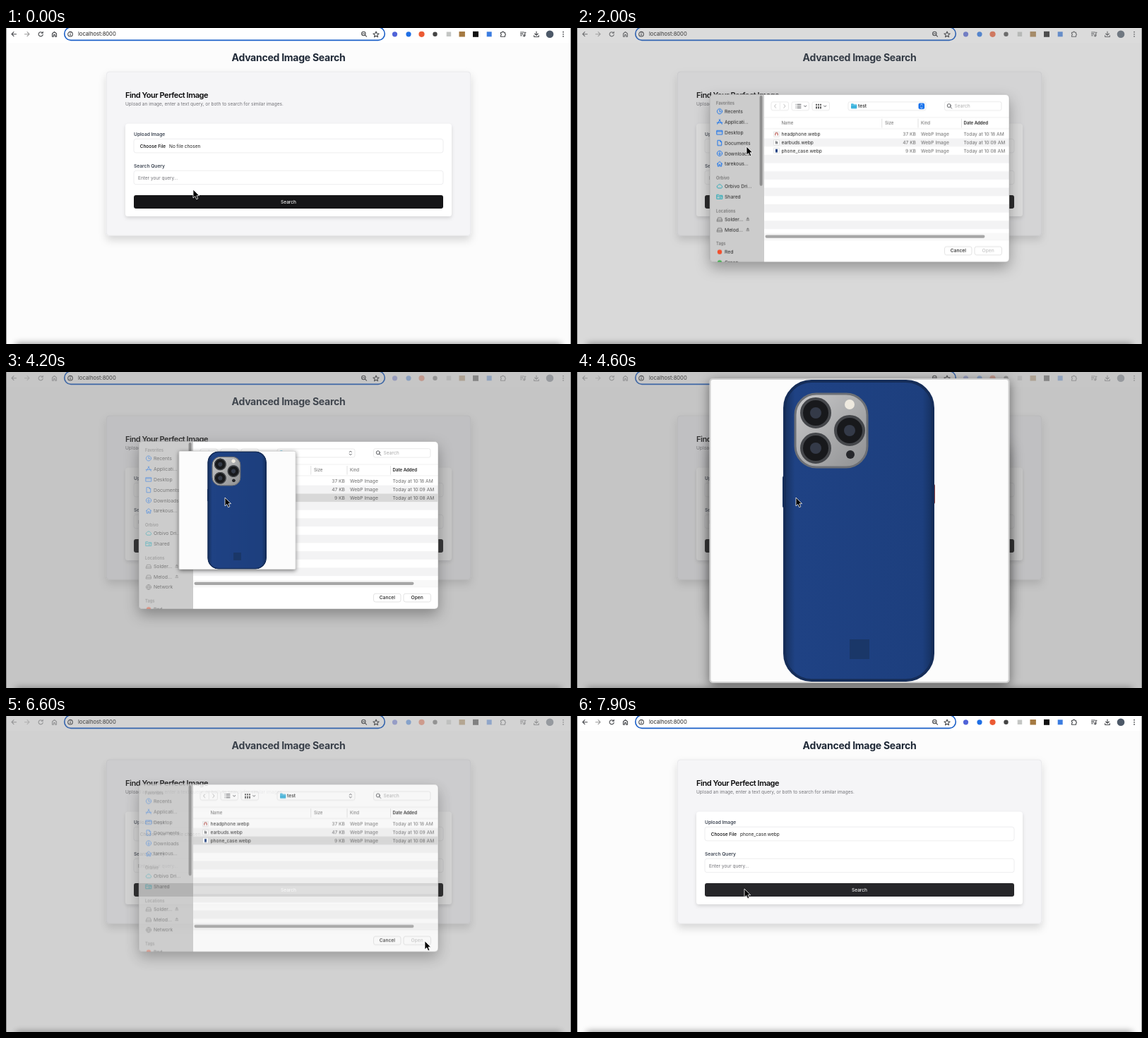
Recreate the animation shown at these times as an HTML page. Size 800 by 448 pixels, loop 8 s.

```html
<!DOCTYPE html>
<html lang="en">
<head>
<meta charset="utf-8">
<title>Advanced Image Search</title>
<style>
html, body { margin: 0; width: 100%; height: 100%; overflow: hidden; background: #fcfcfc; }
svg { display: block; }
text { font: 400 6.5px Inter, "Noto Sans", sans-serif; white-space: pre; }
.medium { font-weight: 500; }
.semi { font-weight: 600; }
.line { fill: none; stroke: #45474b; stroke-width: 1.1; stroke-linecap: round; stroke-linejoin: round; }
.dlg text { font-size: 6.7px; }
.dlg .head { font-size: 6.1px; }
.side text { font-size: 6.8px; fill: #262626; }
.side .group { font-size: 5.8px; font-weight: 600; fill: #777; }
.icon { fill: none; stroke: #1672ee; stroke-width: .95; stroke-linejoin: round; stroke-linecap: round; }
.teal { stroke: #1fa9b8; }
.gray { stroke: #777; }
.sub { fill-opacity: .66; }

/* Every move advances ten times a second */
.cursor, .dim, .tools, .dlg, .preview, .late, .net, .active, .side, .pick, .chosen, .ready, .row2, .before, .after, .hover {
  animation: 8s step-end infinite;
}
.cursor { animation-name: cursor; }
.dim { animation-name: dim; }
.tools { animation-name: tools; }
.dlg { animation-name: dialog; }
.preview { animation-name: preview; }
.late { animation-name: late; }
.net { animation-name: net; }
.active { animation-name: active; }
.side { animation-name: side; }
.pick { animation-name: pick; }
.chosen { animation-name: chosen; }
.ready { animation-name: ready; }
.row2 { animation-name: row; }
.before { animation-name: before; }
.after { animation-name: after; }
.hover { animation-name: hover; }

@keyframes cursor {
  0% { transform: translate(265px, 229px); animation-timing-function: steps(2); }
  2.5% { transform: translate(261px, 220px); animation-timing-function: steps(3); }
  6.25% { transform: translate(247px, 185px); animation-timing-function: steps(4); }
  11.25% { transform: translate(240px, 168px); }
  32.5% { transform: translate(240px, 168px); animation-timing-function: steps(3); }
  36.25% { transform: translate(285px, 166px); animation-timing-function: steps(2); }
  38.75% { transform: translate(305px, 168px); animation-timing-function: steps(3); }
  42.5% { transform: translate(310px, 178px); }
  68.75% { transform: translate(310px, 178px); animation-timing-function: steps(2); }
  71.25% { transform: translate(420px, 245px); animation-timing-function: steps(3); }
  75% { transform: translate(593px, 319px); }
  83.75% { transform: translate(593px, 319px); animation-timing-function: steps(2); }
  86.25% { transform: translate(585px, 310px); animation-timing-function: steps(3); }
  90% { transform: translate(480px, 288px); animation-timing-function: steps(3); }
  93.75% { transform: translate(310px, 258px); animation-timing-function: steps(2); }
  96.25% { transform: translate(250px, 247px); animation-timing-function: steps(2); }
  98.75%, 100% { transform: translate(237px, 245px); }
}
@keyframes dim {
  0% { opacity: 0; }
  25% { opacity: .25; animation-timing-function: steps(4); }
  30% { opacity: .4; }
  80% { opacity: .4; animation-timing-function: steps(2); }
  82.5% { opacity: .31; animation-timing-function: steps(3); }
  86.25%, 100% { opacity: 0; }
}
@keyframes tools {
  0% { opacity: 1; }
  25% { opacity: .8; animation-timing-function: steps(4); }
  30% { opacity: .45; }
  82.5% { opacity: .5; animation-timing-function: steps(3); }
  86.25%, 100% { opacity: 1; }
}
@keyframes dialog {
  0% { opacity: 0; }
  25% { opacity: 1; transform: translateY(-4.3px); animation-timing-function: steps(4); }
  30% { opacity: 1; transform: none; }
  80% { opacity: 1; transform: none; animation-timing-function: steps(2); }
  82.5% { opacity: .84; transform: translateY(-1.7px); animation-timing-function: steps(2); }
  85%, 100% { opacity: 0; transform: translateY(-4px); }
}
@keyframes preview {
  0% { opacity: 0; }
  52.5% { opacity: 1; transform: translate(327.5px, 196px) scale(.39); animation-timing-function: steps(2); }
  55% { opacity: 1; transform: translate(390px, 221px) scale(.916); animation-timing-function: steps(2); }
  57.5% { opacity: 1; transform: translate(400px, 225px) scale(1); }
  65% { opacity: 1; transform: translate(375px, 215px) scale(.79); }
  66.25% { opacity: 1; transform: translate(314.5px, 191px) scale(.286); }
  67.5% { opacity: .6; transform: translate(288px, 180px) scale(.06); }
  68.75%, 100% { opacity: 0; }
}
@keyframes late { 0% { transform: translateY(-14.7px); } 27.5%, 100% { transform: none; } }
@keyframes net { 0% { opacity: 0; } 27.5%, 100% { opacity: 1; } }
@keyframes active { 0%, 68.75% { opacity: 1; } 52.5%, 77.5%, 100% { opacity: 0; } }
@keyframes side { 0%, 68.75% { opacity: 1; } 52.5%, 77.5%, 100% { opacity: .5; } }
@keyframes pick { 0%, 52.5%, 77.5%, 100% { opacity: 0; } 43.75%, 68.75% { opacity: 1; } }
@keyframes chosen { 0% { opacity: 0; } 43.75%, 100% { opacity: 1; } }
@keyframes ready { 0%, 77.5%, 100% { fill: #c4c4c4; } 43.75%, 52.5% { fill: #222; } }
@keyframes row { 0%, 52.5%, 77.5%, 100% { fill: #222; } 43.75%, 68.75% { fill: #fff; } }
@keyframes before { 0% { opacity: 1; } 83.75%, 100% { opacity: 0; } }
@keyframes after { 0% { opacity: 0; } 83.75%, 100% { opacity: 1; } }
@keyframes hover { 0% { fill: #151517; } 95%, 100% { fill: #27272a; } }
</style>
</head>
<body>
<svg width="800" height="448" viewBox="0 0 800 448">
<defs>
  <filter id="soft" x="-10%" y="-200%" width="120%" height="500%"><feGaussianBlur stdDeviation="5"/></filter>
  <filter id="cardShade" x="-10%" y="-10%" width="120%" height="130%"><feDropShadow dx="0" dy="6" stdDeviation="6" flood-opacity=".15"/></filter>
  <filter id="formShade" x="-10%" y="-10%" width="120%" height="130%"><feDropShadow dx="0" dy="2.5" stdDeviation="2.5" flood-opacity=".13"/></filter>
  <filter id="dlgShade" x="-15%" y="-15%" width="130%" height="140%"><feDropShadow dx="0" dy="8" stdDeviation="10" flood-opacity=".32"/></filter>
  <filter id="viewShade" x="-15%" y="-15%" width="130%" height="130%"><feDropShadow dx="0" dy="4" stdDeviation="8" flood-opacity=".5"/></filter>
  <linearGradient id="steel" x2="1" y2="1"><stop stop-color="#c9c9ca"/><stop offset="1" stop-color="#8f9092"/></linearGradient>
  <linearGradient id="case"><stop stop-color="#17315f"/><stop offset=".07" stop-color="#1f4284"/><stop offset=".93" stop-color="#1d3f7e"/><stop offset="1" stop-color="#15305f"/></linearGradient>
  <clipPath id="dlgClip"><rect x="188" y="98.5" width="424" height="237.5" rx="5"/></clipPath>
  <g id="eject"><path d="M239.5 0 241.8-2.7 244.1 0ZM239.5 1h4.6v1h-4.6Z" fill="#777"/></g>
</defs>

<rect width="800" height="448" fill="#fcfcfc"/>
<rect width="800" height="21.5" fill="#fff"/>
<rect x="14" y="447" width="772" height="20" fill="#000" opacity=".42" filter="url(#soft)"/>

<!-- Browser bar -->
<rect x="82.7" y="-1" width="453.6" height="18.4" rx="9.2" fill="#fff" stroke="#1a5fc8" stroke-width="1.6"/>
<text x="102" y="11.3" style="font-size:7.6px" fill="#222">localhost:8000</text>
<g class="line" stroke-width=".9">
  <circle cx="91" cy="8.7" r="3.3"/><path d="M91 8.4v2M91 6.8v.1"/>
  <circle cx="506.3" cy="8" r="2.7"/><path d="M508.4 10.1 510.5 12.2M505 8h2.6"/>
  <path d="M524 5 525.2 7.7 528.1 8 525.9 9.9 526.5 12.8 524 11.3 521.5 12.8 522.1 9.9 519.9 8 522.8 7.7Z"/>
</g>
<g class="tools">
  <g class="line">
    <path d="M14.5 8.7H8M11 5.7 8 8.7 11 11.7"/>
    <path d="M26.5 8.7H33M30 5.7 33 8.7 30 11.7" stroke="#999"/>
    <path d="M51.7 7A3.1 3.1 0 1 0 52.2 9.4M52.2 5.4V7.3H50.2"/>
    <path d="M65.5 8 68.5 5.5 71.5 8V12.2H69.6V9.6H67.4V12.2H65.5Z"/>
    <path d="M700.5 6.3H702.4A1.2 1.2 0 0 1 704.8 6.3H706.5V8.2A1.2 1.2 0 0 1 706.5 10.5V12.3H700.5V10.5A1.2 1.2 0 0 0 700.5 8.2Z"/>
    <path d="M728.5 6H733.5M728.5 8.4H732M728.5 10.8H730.5M734.8 10.8V6.2H736"/><circle cx="733.7" cy="10.8" r="1.1"/>
    <path d="M751 5V10M748.7 8 751 10.3 753.3 8M747.7 10.5V12.5H754.3V10.5"/>
  </g>
  <circle cx="550.5" cy="8.8" r="3.6" fill="#4f63d8"/>
  <circle cx="570" cy="8.8" r="3.6" fill="#1f6fe5"/>
  <circle cx="588.5" cy="8.8" r="4.1" fill="#ec5a33"/>
  <circle cx="607.5" cy="8.8" r="3.2" fill="#444"/>
  <rect x="623.7" y="5.5" width="6.5" height="6.5" fill="#c4c6c4"/>
  <rect x="641.5" y="5" width="8.4" height="7.5" fill="#a57a42"/>
  <rect x="661" y="4.8" width="8" height="8" fill="#111"/>
  <rect x="680.7" y="5.3" width="7" height="7" fill="#3b7ce0"/>
  <circle cx="770" cy="8.8" r="5.3" fill="#4d5968"/>
  <g fill="#45474b"><circle cx="789" cy="5.7" r=".9"/><circle cx="789" cy="8.8" r=".9"/><circle cx="789" cy="11.9" r=".9"/></g>
</g>

<!-- Page -->
<text x="400" y="46.8" text-anchor="middle" style="font-size:14px;font-weight:700;letter-spacing:-.26px" fill="#1f2937">Advanced Image Search</text>
<rect x="142.3" y="62" width="515.4" height="232.3" rx="4" fill="#f5f5f7" stroke="#e3e3e6" stroke-width=".7" filter="url(#cardShade)"/>
<text x="169" y="98.8" class="semi" style="font-size:11px;letter-spacing:-.45px" fill="#0a0a0b">Find Your Perfect Image</text>
<text x="169" y="110.2" fill="#737378">Upload an image, enter a text query, or both to search for similar images.</text>
<rect x="169" y="135.7" width="462" height="131.3" rx="4" fill="#fff" filter="url(#formShade)"/>
<text x="181" y="153" class="semi" style="font-size:6.65px" fill="#3f4754">Upload Image</text>
<text x="181" y="197.8" class="semi" style="font-size:6.65px" fill="#3f4754">Search Query</text>
<g fill="#fff" stroke="#e6e6e9" stroke-width=".7">
  <rect x="181" y="157.3" width="438" height="19.6" rx="3"/>
  <rect x="181" y="202.3" width="438" height="19.4" rx="3"/>
</g>
<text x="189.7" y="169.5" class="medium" fill="#0a0a0b">Choose File</text>
<text x="231" y="169.5" class="before" fill="#222">No file chosen</text>
<text x="231" y="169.5" class="after" fill="#222">phone_case.webp</text>
<text x="187" y="214.5" fill="#737378">Enter your query...</text>
<rect class="hover" x="181" y="237" width="438" height="19" rx="3" fill="#151517"/>
<text x="400" y="248.7" text-anchor="middle" class="medium" fill="#f5f5f5">Search</text>

<rect class="dim" width="800" height="448" fill="#707070"/>
<path d="M.4 0V448M799.6 0V448" stroke="#777" stroke-width=".8"/>

<!-- File dialog -->
<g class="dlg">
  <rect x="188" y="98.5" width="424" height="237.5" rx="5" fill="#fff" filter="url(#dlgShade)"/>
  <g clip-path="url(#dlgClip)">
    <rect x="188" y="98.5" width="76.5" height="238" fill="#ccc"/>
    <path d="M264.5 98V337" stroke="#b9b9b9" stroke-width=".6"/>
    <g class="side" id="side"></g>
    <rect x="258.6" y="100" width="4" height="128" rx="2" fill="#8e8e8e"/>
    <g id="stripes" fill="#f3f3f4"></g>
    <path d="M265 131H612M265 147H612M265 304.7H612" stroke="#e6e6e6" stroke-width=".6"/>
    <path d="M431.7 133V145.5M483 133V145.5M544.5 133V145.5" stroke="#d4d4d4" stroke-width=".7"/>
    <rect x="265" y="295" width="347" height="9.5" fill="#f8f8f8"/>
    <rect x="266.5" y="297.7" width="311" height="4.2" rx="2.1" fill="#a6a6a6"/>
  </g>
  <rect x="188" y="98.5" width="424" height="237.5" rx="5" fill="none" stroke="#999" stroke-width=".5"/>

  <g fill="#fff" stroke="#dcdcdc" stroke-width=".6">
    <rect x="275" y="109" width="24.5" height="12" rx="2.5"/>
    <rect x="304" y="109" width="24.5" height="12" rx="2.5"/>
    <rect x="333" y="109" width="24.5" height="12" rx="2.5"/>
    <rect x="384" y="109" width="110" height="12" rx="2.5"/>
    <rect x="520.5" y="108.7" width="80.5" height="12.4" rx="2.5"/>
    <path d="M287.3 110V120"/>
  </g>
  <g class="line" style="stroke-width:.9">
    <path d="M281.7 112.5 279.5 115 281.7 117.5M292.8 112.5 295 115 292.8 117.5" stroke="#bbb" style="stroke:#b5b5b5"/>
    <path d="M310 112.5h.1M310 115h.1M310 117.5h.1M312 112.5H317M312 115H317M312 117.5H317"/>
    <path d="M321.6 114.3 323.2 115.9 324.8 114.3M349.6 114.3 351.2 115.9 352.8 114.3"/>
    <circle cx="526.8" cy="114.3" r="2.5"/><path d="M528.7 116.2 530.6 118.2"/>
    <path d="M486.2 113.7 487.8 112.1 489.4 113.7M486.2 116.1 487.8 117.7 489.4 116.1"/>
  </g>
  <path d="M338 112h2v2h-2zM341 112h2v2h-2zM344 112h2v2h-2zM338 115.5h2v3h-2zM341 115.5h2v3h-2zM344 115.5h2v3h-2z" fill="#555"/>
  <path d="M388 112.2q0-.8.8-.8h2.3l1 1h3.4q.8 0 .8.8v4.6q0 .8-.8.8h-6.7q-.8 0-.8-.8z" fill="#36b1dc"/>
  <path d="M388 113.8h8.3" stroke="#8fd7ef" stroke-width=".7"/>
  <text x="398" y="117.3" class="medium" fill="#222">test</text>
  <g class="active">
    <rect x="483.5" y="110.7" width="8.6" height="8.6" rx="2" fill="#1470ec"/>
    <path d="M486.2 113.8 487.8 112.2 489.4 113.8M486.2 116.2 487.8 117.8 489.4 116.2" fill="none" stroke="#fff" stroke-width=".9"/>
  </g>
  <text x="534.5" y="117.3" fill="#aaa">Search</text>

  <g fill="#666">
    <text class="head" x="289.5" y="141.2">Name</text>
    <text class="head" x="436" y="141.2">Size</text>
    <text class="head" x="487" y="141.2">Kind</text>
  </g>
  <text class="head semi" x="547.5" y="141.2" fill="#222">Date Added</text>

  <rect class="chosen" x="265" y="172.4" width="347" height="11.7" fill="#d8d8d8"/>
  <rect class="pick" x="265" y="172.4" width="347" height="11.7" fill="#1261d6"/>
  <g id="rows"></g>

  <g fill="#fff" stroke="#d2d2d2" stroke-width=".6">
    <rect x="520.5" y="314.2" width="38.5" height="11.8" rx="2.8"/>
    <rect x="563" y="314.2" width="38.5" height="11.8" rx="2.8"/>
  </g>
  <text x="539.8" y="322.4" text-anchor="middle" class="medium" fill="#222">Cancel</text>
  <text x="582.2" y="322.4" text-anchor="middle" class="ready medium">Open</text>
  <g class="pick">
    <rect x="563" y="314.2" width="38.5" height="11.8" rx="2.8" fill="#1672ee"/>
    <text x="582.2" y="322.4" text-anchor="middle" class="medium" fill="#fff">Open</text>
  </g>
</g>

<!-- Enlarged picture, drawn around its centre -->
<g class="preview">
  <rect x="-211.5" y="-215" width="423" height="430" rx="4" fill="#fcfcfc" stroke="#cfcfcf" stroke-width="2" filter="url(#viewShade)"/>
  <rect x="-109" y="-78" width="6" height="46" rx="3" fill="#17305c"/>
  <rect x="102" y="-66" width="5" height="28" rx="2" fill="#8b4143"/>
  <rect x="-106" y="-212" width="210" height="424" rx="38" fill="url(#case)" stroke="#152d59" stroke-width="4"/>
  <rect x="-91" y="-194" width="102" height="104" rx="30" fill="url(#steel)" stroke="#6d7076" stroke-width="3"/>
  <g fill="#18191c" stroke="#45474b" stroke-width="4">
    <circle cx="-62" cy="-167" r="20"/><circle cx="-62" cy="-117" r="20"/><circle cx="-14" cy="-142" r="20"/>
  </g>
  <g fill="#343a48"><circle cx="-62" cy="-167" r="8"/><circle cx="-62" cy="-117" r="8"/><circle cx="-14" cy="-142" r="8"/></g>
  <circle cx="-14" cy="-179" r="7" fill="#eee9df"/><circle cx="-13" cy="-108" r="6" fill="#26272b"/>
  <rect x="-14" y="154" width="28" height="28" fill="#1a3768"/>
</g>

<path class="cursor" d="M0 0V12L2.8 9.5 4.7 13.8 6.8 12.9 5 8.7H8.6Z" fill="#000" stroke="#fff" stroke-width=".8" stroke-linejoin="round"/>
</svg>
<script>
const byId = id => document.getElementById(id);

// Icon outlines, centred on 0,0
const disk = 'M-3.5 1 -2.3-2H2.3L3.5 1V3H-3.5ZM-3.5 1H3.5';
const icons = {
  clock: 'M3.6 0A3.6 3.6 0 1 1 3.6-.1M0-2V.3H1.8',
  apps: 'M-3.3 3 .6-3.4M3.3 3-.6-3.4M-3.8 1H3.8',
  desk: 'M-3.8-2.6H3.8V2.8H-3.8ZM-3.8-1.2H3.8',
  doc: 'M-2.6-3.6H.8L2.7-1.7V3.6H-2.6ZM.8-3.6V-1.7H2.7',
  down: 'M3.6 0A3.6 3.6 0 1 1 3.6-.1M0-1.9V1.7M-1.4.4 0 1.8 1.4.4',
  home: 'M-3.8 0 0-3.4 3.8 0M-2.7-.7V3.2H-.8V.8H.8V3.2H2.7V-.7',
  cloud: 'M-2.3 2.4A1.9 1.9 0 0 1-2.4-1.3 2.7 2.7 0 0 1 2.5-1 1.8 1.8 0 0 1 2.4 2.4Z',
  folder: 'M-3.8-2.8H-1L0-1.8H3.8V3H-3.8ZM-3.8-.5H3.8M0 1.4H1.8',
  disk,
  globe: 'M3.6 0A3.6 3.6 0 1 1 3.6-.1M-3.6 0H3.6M0-3.6C-2-1.5-2 1.5 0 3.6 2 1.5 2-1.5 0-3.6'
};
const group = (y, name) => `<text class="group" x="197" y="${y + 2}">${name}</text>`;
const item = (y, name, icon, tone = '') =>
  `<path class="icon ${tone}" transform="translate(202 ${y})" d="${icons[icon]}"/>` +
  `<text x="209" y="${y + 2.4}">${name}</text>`;
const tag = (y, name, color) =>
  `<circle cx="202" cy="${y}" r="3.2" fill="${color}"/><text x="209" y="${y + 2.4}">${name}</text>`;
const eject = y => `<use href="#eject" y="${y}"/>`;

byId('side').innerHTML =
  group(111, 'Favorites') +
  item(122.5, 'Recents', 'clock') +
  item(137.4, 'Applicati...', 'apps') +
  item(152.3, 'Desktop', 'desk') +
  item(167.2, 'Documents', 'doc') +
  item(182.1, 'Downloads', 'down') +
  item(197, 'tarekous...', 'home') +
  group(217, 'Orbivo') +
  item(228.7, 'Orbivo Dri...', 'cloud', 'teal') +
  item(243.5, 'Shared', 'folder', 'teal') +
  group(264, 'Locations') +
  item(275.3, 'Solder...', 'disk', 'gray') + eject(275.3) +
  item(290.1, 'Melod...', 'disk', 'gray') + eject(290.1) +
  `<g class="net">${item(305, 'Network', 'globe', 'gray')}</g>` +
  `<g class="late">${group(325.2, 'Tags')}${tag(336.5, 'Red', '#f2502e')}${tag(351.3, 'Green', '#3cb54a')}</g>`;

const rowHeight = 11.68;
let stripes = '';
for (let i = 1; i < 12; i += 2)
  stripes += `<rect x="265" y="${149 + i * rowHeight}" width="347" height="${rowHeight}"/>`;
byId('stripes').innerHTML = stripes;

const files = [
  ['headphone.webp', 37, '10:18', '#b0443c'],
  ['earbuds.webp', 47, '10:09', '#55585c'],
  ['phone_case.webp', 9, '10:08', '#1f4284']
];
const thumbs = [
  '<path d="M-1.7 1.6V-.4A1.7 1.7 0 0 1 1.7-.4V1.6" fill="none" stroke-width="1.1"/>',
  '<path d="M-.8-2V1.8M.9-1.3V2" stroke-width="1.2"/>',
  '<path d="M0-2.3V2.3" stroke-width="3"/>'
];
byId('rows').innerHTML = files.map(([name, size, time, color], i) => {
  const y = 154.9 + i * rowHeight, base = y + 2.4;
  return `<g class="row${i}" fill="#222">
    <rect x="278.8" y="${y - 3.7}" width="7.4" height="7.4" fill="#fff" stroke="#ccc" stroke-width=".5"/>
    <g transform="translate(282.5 ${y})" stroke="${color}">${thumbs[i]}</g>
    <text x="289.5" y="${base}">${name}</text>
    <g class="sub"><text x="480" y="${base}" text-anchor="end">${size} KB</text>
    <text x="487" y="${base}">WebP Image</text>
    <text x="547.5" y="${base}">Today at ${time} AM</text></g></g>`;
}).join('');
</script>
</body>
</html>
```
